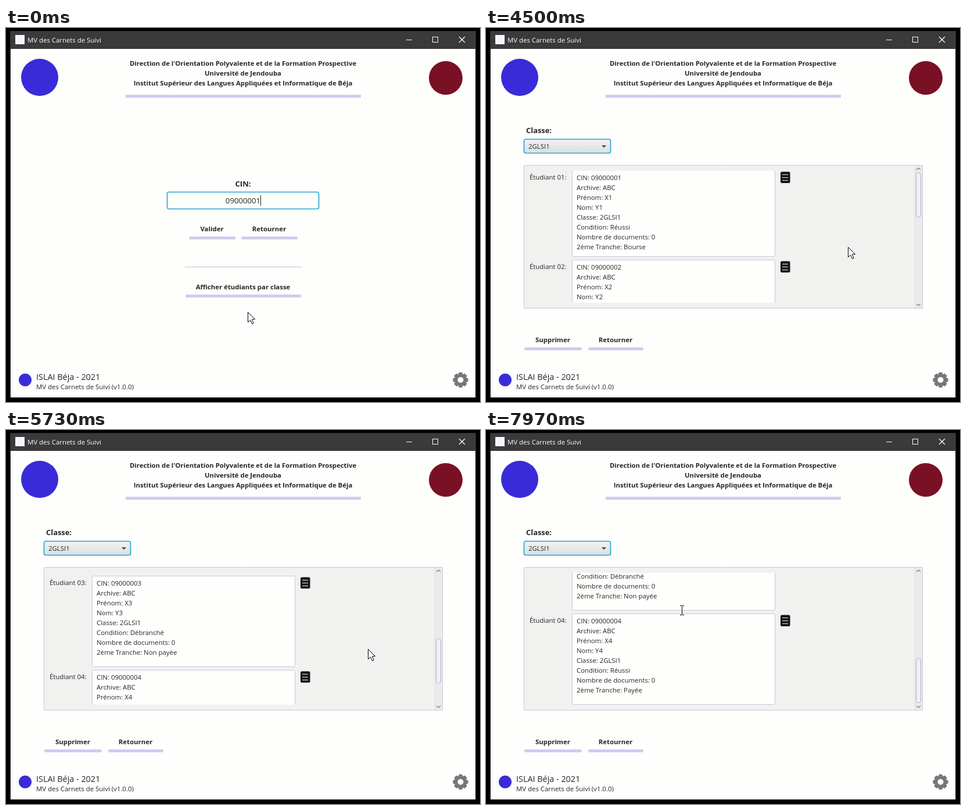
An HTML page with a canvas that plays this animation: 816 px wide and 644 px high, repeating every 8000 ms.

```html
<!DOCTYPE html>
<html lang="fr">
<head>
<meta charset="utf-8">
<title>Carnets</title>
<style>
html, body { margin: 0; width: 100%; height: 100%; overflow: hidden; background: #000; }
canvas { display: block; }
</style>
</head>
<body>
<canvas id="stage" width="816" height="644"></canvas>
<script>
const ctx = document.getElementById('stage').getContext('2d');
const LOOP = 8000;
const FONT = '"Open Sans", "Noto Sans", sans-serif';
const APP = 'MV des Carnets de Suivi';
const INK = '#262626', PAGE = '#fefefc', PANEL = '#f1f1f0', EDGE = '#c8c8dc', BAR = '#d1cbee', FOCUS = '#1fa6d4', GREY = '#777777';

const students = [
  { top: 246, h: 148, state: 'Réussi', fee: 'Bourse' },
  { top: 400, h: 156, state: 'Réussi', fee: 'Payée' },
  { top: 562, h: 156, state: 'Débranché', fee: 'Non payée' },
  { top: 724, h: 156, state: 'Réussi', fee: 'Payée' }
];

// [start, end, from, to]
const scrolls = [[4485, 4800, 0, 120], [5115, 5400, 120, 309], [5712, 5970, 309, 408]];
const moves = [
  [690, 1300, [416, 489], [409, 462]],
  [3010, 3500, [409, 462], [623, 377]],
  [7680, 7970, [623, 377], [337, 310]]
];

const clamp = v => Math.max(0, Math.min(1, v));
const progress = (t, a, b) => clamp((t - a) / (b - a));
const smooth = p => p * p * (3 - 2 * p);
const mix = (a, b, p) => a + (b - a) * p;

function rect(x, y, w, h, color) {
  ctx.fillStyle = color;
  ctx.fillRect(x, y, w, h);
}

function box(x, y, w, h, r, fill, stroke, width = 1) {
  ctx.beginPath();
  ctx.roundRect(x, y, w, h, r);
  if (fill) { ctx.fillStyle = fill; ctx.fill(); }
  if (stroke) { ctx.strokeStyle = stroke; ctx.lineWidth = width; ctx.stroke(); }
}

function disc(x, y, r, color) {
  ctx.beginPath();
  ctx.arc(x, y, r, 0, Math.PI * 2);
  ctx.fillStyle = color;
  ctx.fill();
}

function line(points, color, width = 1) {
  ctx.beginPath();
  points.forEach(([x, y], i) => i ? ctx.lineTo(x, y) : ctx.moveTo(x, y));
  ctx.strokeStyle = color;
  ctx.lineWidth = width;
  ctx.stroke();
}

function shape(points, color) {
  ctx.beginPath();
  points.forEach(([x, y]) => ctx.lineTo(x, y));
  ctx.closePath();
  ctx.fillStyle = color;
  ctx.fill();
}

function text(str, x, y, { size = 11.4, bold = false, align = 'left', color = INK } = {}) {
  ctx.font = `${bold ? 'bold ' : ''}${size}px ${FONT}`;
  ctx.textAlign = align;
  ctx.fillStyle = color;
  ctx.fillText(str, x, y);
}

function button(label, x, y, w, hover = false) {
  text(label, x + w / 2 - 0.5, y, { size: 11.4, bold: true, align: 'center' });
  box(x, y + 9, w, 5, 2, hover ? '#b4addc' : BAR);
}

function gear(x, y) {
  ctx.save();
  ctx.translate(x, y);
  for (let i = 0; i < 8; i++) {
    ctx.rotate(Math.PI / 4);
    shape([[-4, -8], [-3, -13], [3, -13], [4, -8]], GREY);
  }
  ctx.restore();
  disc(x, y, 10.5, GREY);
  disc(x, y, 5, PAGE);
}

function drawFrame() {
  rect(0, 0, 816, 644, '#000');
  rect(7, 5, 802, 632, '#303030');
  rect(8, 6, 800, 30, '#3a3a3a');
  rect(8, 36, 800, 600, PAGE);

  rect(16, 12, 16, 16, '#f4f4ff');
  text(APP, 37, 25, { color: '#fff' });
  line([[689, 20.5], [699, 20.5]], '#fff');
  ctx.strokeRect(734.5, 15.5, 9, 9);
  line([[780, 15], [790, 25]], '#fff', 1.2);
  line([[790, 15], [780, 25]], '#fff', 1.2);

  disc(58, 85, 32, '#3a2bd8');
  disc(757, 86, 29, '#7a1024');
  const head = { size: 11.35, bold: true, align: 'center' };
  text("Direction de l'Orientation Polyvalente et de la Formation Prospective", 408, 65, head);
  text('Université de Jendouba', 408, 82, head);
  text('Institut Supérieur des Langues Appliquées et Informatique de Béja', 408, 99, head);
  rect(206, 115, 405, 5, BAR);

  disc(33, 606, 11, '#3a2bd8');
  text('ISLAI Béja - 2021', 52, 606, { size: 14.4 });
  text(APP + ' (v1.0.0)', 52, 622);
  gear(782.5, 606);
}

function drawLogin(t, pointer) {
  text('CIN:', 408, 273, { size: 13, bold: true, align: 'center' });
  box(277.5, 282.5, 261, 29, 3, PAGE, FOCUS, 1.6);
  text('09000001', 408, 302, { size: 13.2, align: 'center' });
  // The caret blinks every 500 ms.
  if (Math.floor((t + 700) / 500) % 2 === 0 || t < 300) rect(438, 288, 1, 18, '#222');
  button('Valider', 315, 350, 80);
  button('Retourner', 405, 350, 97);
  rect(308, 411, 201, 1, '#c4c4c4');
  button('Afficher étudiants par classe', 309, 450, 199, pointer[1] < 466);
}

function drawStudent({ top, h, state, fee }, i, offset) {
  const y = top - offset, n = i + 1;
  text(`Étudiant 0${n}:`, 75, y + 16);
  box(148.5, y + 0.5, 349, h, 2, PAGE, EDGE);
  [
    `CIN: 0900000${n}`, 'Archive: ABC', `Prénom: X${n}`, `Nom: Y${n}`, 'Classe: 2GLSI1',
    `Condition: ${state}`, 'Nombre de documents: 0', `2ème Tranche: ${fee}`
  ].forEach((row, k) => text(row, 156, y + 17 + k * 17));
  box(507, y + 2.5, 16.5, 19.5, 2.5, '#141414');
  for (let k = 0; k < 3; k++) rect(510, y + 7 + k * 5, 10, 1, '#eee');
}

function drawList(offset) {
  text('Classe:', 69, 181, { size: 12.9, bold: true });
  const shade = ctx.createLinearGradient(0, 191, 0, 216);
  shade.addColorStop(0, '#f2f2f2');
  shade.addColorStop(1, '#dedede');
  box(65.5, 191.5, 149, 24, 3, shade, FOCUS, 1.6);
  text('2GLSI1', 73, 208);
  shape([[199, 202], [207, 202], [203, 206]], '#444');

  box(65.5, 236.5, 686, 246, 0, PANEL, EDGE);
  ctx.save();
  ctx.beginPath();
  ctx.rect(66, 246, 672, 227);
  ctx.clip();
  students.forEach((s, i) => drawStudent(s, i, offset));
  ctx.restore();

  rect(738, 237, 13, 245, '#ebebeb');
  rect(738, 237, 1, 245, '#dcdce4');
  line([[741, 244], [744.5, 241], [748, 244]], GREY, 1.2);
  line([[741, 475], [744.5, 478], [748, 475]], GREY, 1.2);
  const thumb = 249 + Math.round(offset * 144 / 408);
  box(740.5, thumb + 0.5, 8, 76, 3, '#f0f0f4', '#b0b0bc');

  button('Supprimer', 66, 541, 99);
  button('Retourner', 176, 541, 95);
}

function drawArrow(x, y) {
  const p = [[0, 0], [0, 17], [4, 13.4], [7, 20], [9.6, 18.8], [6.8, 12.3], [12, 12]]
    .map(([a, b]) => [x + a + 0.5, y + b + 0.5]);
  shape(p, '#fff');
  line([...p, p[0]], '#000');
}

function drawBeam(x, y) {
  rect(x, y - 7, 1, 15, '#000');
  for (const dy of [-8, 8]) {
    rect(x - 3, y + dy, 3, 1, '#000');
    rect(x + 1, y + dy, 3, 1, '#000');
  }
}

function pointerAt(t) {
  let pos = moves[0][2];
  for (const [a, b, from, to] of moves) {
    if (t < a) break;
    const p = smooth(progress(t, a, b));
    pos = from.map((v, i) => Math.round(mix(v, to[i], p)));
  }
  return pos;
}

function scrollAt(t) {
  let y = 0;
  for (const [a, b, from, to] of scrolls) {
    if (t >= a) y = Math.round(mix(from, to, smooth(progress(t, a, b))));
  }
  return y;
}

function draw(t) {
  const pointer = pointerAt(t), [x, y] = pointer;
  const listed = t >= 2000;
  drawFrame();
  if (listed) {
    ctx.globalAlpha = progress(t, 1985, 2485);
    drawList(scrollAt(t));
    ctx.globalAlpha = 1;
  } else {
    drawLogin(t, pointer);
  }
  const overText = listed && x > 148 && x < 498 && y > 246 && y < 473;
  (overText ? drawBeam : drawArrow)(x, y);
}

function tick() {
  draw(performance.now() % LOOP);
  requestAnimationFrame(tick);
}
tick();
</script>
</body>
</html>
```
